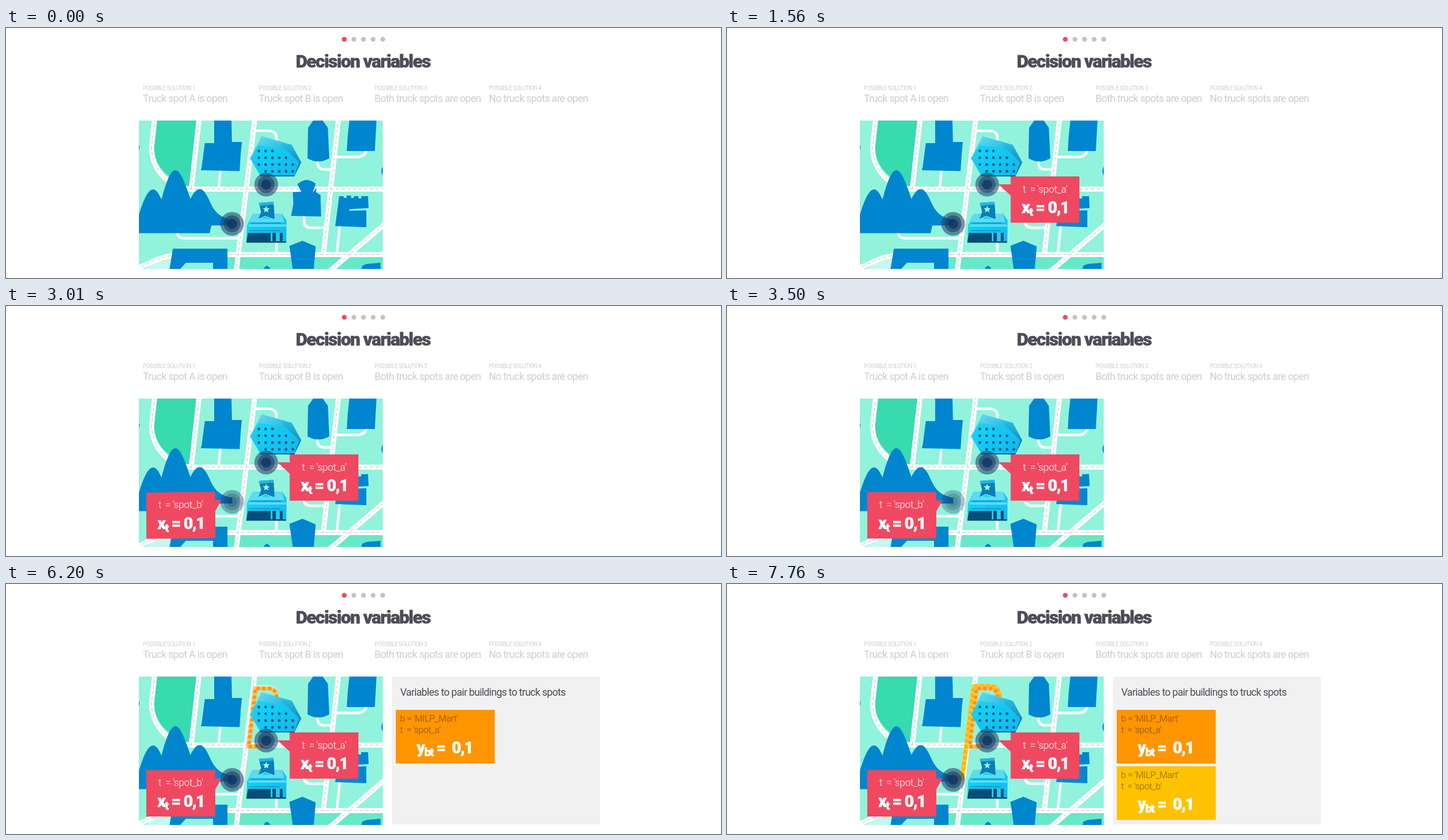
These frames come from a looping animation (1264x443 px, 8000 ms). An HTML page:

```html
<!DOCTYPE html>
<html lang="en">
<head>
<meta charset="utf-8">
<title>Decision variables</title>
<style>
  html, body { margin: 0; width: 100%; height: 100%; overflow: hidden; background: #fff; }
  svg { display: block; width: 1264px; height: 443px; }
  text { font-family: Roboto, "Open Sans", sans-serif; white-space: pre; letter-spacing: -.7px; }
  .title { font-weight: 900; font-size: 32px; letter-spacing: -1.5px; fill: #4e4c59; stroke: #4e4c59; stroke-width: .6; }
  .label { font-size: 10px; letter-spacing: -.55px; fill: #cecece; }
  .option { font-size: 18px; fill: #cdcdcd; }
  .head { font-size: 18px; fill: #4c4a57; }
  .set { font-size: 18px; fill: #fac3cb; }
  .pair { font-size: 16.5px; fill: #000; fill-opacity: .32; }
  .value { font-weight: 900; font-size: 29px; letter-spacing: -1.4px; fill: #fff; stroke: #fff; stroke-width: .5; }
  .sub { font-size: 20px; }
  .blue { fill: #0086cf; }
  .road { fill: none; stroke: #fff; stroke-width: 9; }
  .dash { fill: none; stroke: #bcc4c4; stroke-width: 1; stroke-dasharray: 6 4; }
  .lane { fill: none; stroke: #fff; stroke-width: 4.6; }
  .route { fill: none; stroke-width: 8; stroke-linejoin: round; }
  .beads { fill: none; stroke-width: 6.5; stroke-linecap: round; stroke-dasharray: .1 10; }
</style>
</head>
<body>
<svg viewBox="0 0 1264 443">
  <defs>
    <clipPath id="frame"><rect x="235" y="164" width="431" height="263"/></clipPath>
    <linearGradient id="roof" x2="1" y2=".6"><stop stop-color="#72dff2"/><stop offset="1" stop-color="#15b5e2"/></linearGradient>
    <linearGradient id="wall" x2="1" y2="1"><stop stop-color="#13dcf7"/><stop offset="1" stop-color="#12b5ea"/></linearGradient>
    <linearGradient id="side" y2="1" x2="0"><stop stop-color="#25b9e2"/><stop offset="1" stop-color="#086ea9"/></linearGradient>
    <path id="roads" d="M263 160L257.5 210C256 248 286 284 328 285.5H670M341.500 160L327.500 285M440 160L407 431M588 160L561 401M230 427C262 414 275 402 315 401.500H670M572 431L670 347"/>
    <path id="wayA" d="M452 288H429L441 185H464Q479 185 478 203"/>
    <path id="wayB" d="M402 344H416L434 196L437 181H466Q482 182 482 202"/>
    <g id="spot" fill="#17365f">
      <circle r="21" fill="#24426f" fill-opacity=".57"/>
      <circle r="15" fill-opacity=".55"/>
      <circle r="9" fill="#0c3763" fill-opacity=".8"/>
    </g>
  </defs>

  <g id="nav"></g>
  <text class="title" x="631" y="70" text-anchor="middle">Decision variables</text>
  <g id="options"></g>

  <g clip-path="url(#frame)">
    <rect x="234" y="164" width="433" height="264" fill="#91f3dc"/>
    <path fill="#38dab0" d="M267 164H337L324 281C292 273 260 246 261.500 210Z"/>
    <path fill="#67e8c8" d="M410 404H602L574 428H385V404ZM610 404H667V428H583Z"/>
    <path fill="#c5f8ec" d="M245 428Q270 409 296 406L290 428Z"/>
    <path class="lane" d="M439 182H462Q480 182 478 198V215M379 252L376 284M303 362Q303 372.500 314 372.500H414M551 235Q549 250 562 250.500H577M580 228.500H620Q637 228 637 214M527 332V342Q527 354 539 354H567M590 350L585 400M478 378V400"/>
    <use href="#roads" class="road"/>
    <use href="#roads" class="dash"/>

    <g class="blue">
      <path d="M368 164H398.500L399.500 202H417L415 222L413 253.500L344.500 252L346 246L351.500 204H368Z"/>
      <path d="M543 164H560L569 177L571.500 231Q552 242 533 231L534 177Z"/>
      <path d="M607 164H655L652 218H602.500L604 192Z"/>
      <path d="M234 206Q238 210 235 216H234ZM667 244Q660 253 667 263Z"/>
      <path d="M234 334C245 297 253 286 260 286C267 286 272 298 275 304C284 268 292 252 299.500 252C309 252 318 279 326 303C332 291 337 285.500 342.500 285.500C351 285.500 357 300 363 313C372 331 383 336 400 340V350H363L360 363.500H234Z"/>
      <path d="M507 291L522 290L515 277Q531 262 547.500 276L542 292L549 283L548 291L556 296L557 334L504 333L508 312Z"/>
      <path d="M589 298H597V301H602V297H610V301H615V298H623V302H628V298H640L641 319L607 321V324L637 323V353L582 351Z"/>
      <path d="M295 391H391.500V428H366V416H318L307 428H289Z"/>
      <path d="M501 386L524 377L547.500 387L544 428H507Z"/>
      <path d="M455 428Q461 415 468 428ZM628 428L630 421L638 418L662 416V428Z"/>
    </g>

    <g id="routeB"><use href="#wayB" class="route" stroke="#ffc83c"/><use href="#wayB" class="beads" stroke="#ffb400"/></g>
    <g id="routeA"><use href="#wayA" class="route" stroke="#f9bd62" stroke-opacity=".85"/><use href="#wayA" class="beads" stroke="#ff9500"/></g>

    <path fill="url(#wall)" d="M452 192L505 207L522 238L510 262.500H450L431.500 231Z"/>
    <path fill="url(#roof)" d="M452 192L505 207L509 218L447 207L431.500 231Z"/>
    <path fill="url(#side)" d="M487 207L505 207L522 238L510 262L518 238Z"/>
    <path stroke="#0b5f95" stroke-width="2" d="M449 262H510"/>
    <g id="holes" fill="#0a568e"></g>

    <path fill="#087fb8" d="M447 310L473 308L475 339L458 333L445 339L451 326Z"/>
    <path fill="#23b6e2" d="M447 310L473 308V313L448 315Z"/>
    <path fill="#a8f2fb" d="M460 315l1.700 4.200 4.500.300-3.500 2.900 1.100 4.400-3.800-2.400-3.800 2.400 1.100-4.400-3.500-2.900 4.500-.300Z"/>
    <path fill="url(#wall)" d="M436 329H450L446 340L458 334L475 340V329H488L496 341L495.500 380H425L426 350Z"/>
    <path fill="#5edaf1" d="M436 329H449L446 338H475V329H488L492 344H430ZM429 348H495V352H428Z"/>
    <path fill="#0b93c8" d="M433 345H486V346.500H432ZM430 358.500H484V360H430Z"/>
    <path fill="#084c78" d="M428 363H489V378H495V380.500H425V378Z"/>
    <path fill="#24cbee" d="M468 363H471V378H468ZM477 363H484V378H477Z"/>
  </g>

  <use id="spotA" href="#spot" x="460" y="277.500"/>
  <use id="spotB" href="#spot" x="399.700" y="347"/>

  <g id="calloutA">
    <path fill="#f04860" d="M501.500 263H623V345H501.500V297L480 277H501.500Z"/>
    <text class="set" x="523" y="292">t  = 'spot_a'</text>
    <text class="value" x="521" y="328">x<tspan class="sub" dy="5">t</tspan><tspan dy="-5"> = 0,1</tspan></text>
  </g>
  <g id="calloutB">
    <path fill="#f04860" d="M248 330H370V344.500H381L370 364V412H248Z"/>
    <text class="set" x="269" y="358">t  = 'spot_b'</text>
    <text class="value" x="267.500" y="395">x<tspan class="sub" dy="5">t</tspan><tspan dy="-5"> = 0,1</tspan></text>
  </g>

  <g id="panel">
    <rect x="682" y="164" width="368" height="262" fill="#f1f1f1"/>
    <text class="head" x="697" y="197.500">Variables to pair buildings to truck spots</text>
  </g>
  <g id="pairA"></g>
  <g id="pairB"></g>
</svg>
<script>
const LOOP = 8000;
const el = id => document.getElementById(id);
const clamp = v => Math.min(1, Math.max(0, v));
const range = n => [...Array(n).keys()];

// Static repeats
el('nav').innerHTML = range(5).map(i =>
  `<circle cx="${598 + i * 17}" cy="20" r="4.300" fill="${i ? '#c3c3c3' : '#f04860'}"/>`).join('');

const options = [
  [242, 'Truck spot A is open'],
  [447, 'Truck spot B is open'],
  [651.5, 'Both truck spots are open'],
  [853.5, 'No truck spots are open']
];
el('options').innerHTML = options.map(([x, name], i) =>
  `<text class="label" x="${x}" y="109.500">POSSIBLE SOLUTION ${i + 1}</text>
   <text class="option" x="${x}" y="131">${name}</text>`).join('');

const holeRows = [[0, 3], [0, 5], [0, 6], [1, 6]];
el('holes').innerHTML = holeRows.map(([from, to], row) =>
  range(to - from).map(i =>
    `<circle cx="${447 + (from + i) * 12}" cy="${218 + row * 12}" r="2.400"/>`).join('')).join('');

function fillPair(id, y, color, spot) {
  el(id).innerHTML = `<rect x="689" y="${y}" width="175" height="95" fill="${color}"/>
    <text class="pair" x="696.500" y="${y + 20.5}">b = 'MILP_Mart'</text>
    <text class="pair" x="696.500" y="${y + 40.5}">t  = '${spot}'</text>
    <text class="value" x="726" y="${y + 76.5}">y<tspan class="sub" dy="5">bt</tspan><tspan dy="-5"> =  0,1</tspan></text>`;
}
fillPair('pairA', 223, '#ff9500', 'spot_a');
fillPair('pairB', 323, '#ffc200', 'spot_b');

// cubic-bezier(.25, .1, .25, 1)
function ease(p) {
  if (p <= 0 || p >= 1) return clamp(p);
  const curve = (a, b, s) => 3 * a * s * (1 - s) ** 2 + 3 * b * s * s * (1 - s) + s ** 3;
  let lo = 0, hi = 1;
  for (let i = 0; i < 24; i++) {
    const mid = (lo + hi) / 2;
    if (curve(.25, .25, mid) < p) lo = mid; else hi = mid;
  }
  return curve(.1, 1, lo);
}

const fade = (id, v) => el(id).setAttribute('opacity', v);

function flash(id, t) {
  const p = clamp(t / 1050);
  fade(id, Math.abs(1 - (p * 4) % 2));
}

function spinIn(id, t, cx, cy) {
  const p = ease(clamp(t / 470));
  fade(id, p);
  el(id).setAttribute('transform', `rotate(${-200 * (1 - p)} ${cx} ${cy})`);
}

function draw(t) {
  flash('spotA', t - 1040);
  flash('spotB', t - 2570);
  spinIn('calloutA', t - 1040, 562.5, 304);
  spinIn('calloutB', t - 2570, 309, 371);
  fade('panel', t >= 4710 ? 1 : 0);
  const first = ease(clamp((t - 5690) / 510));
  const second = ease(clamp((t - 7250) / 510));
  fade('pairA', first);
  fade('routeA', first);
  fade('pairB', second);
  fade('routeB', second);
}

const start = performance.now();
function tick() {
  draw((performance.now() - start) % LOOP);
  requestAnimationFrame(tick);
}
draw(0);
requestAnimationFrame(tick);
</script>
</body>
</html>
```
